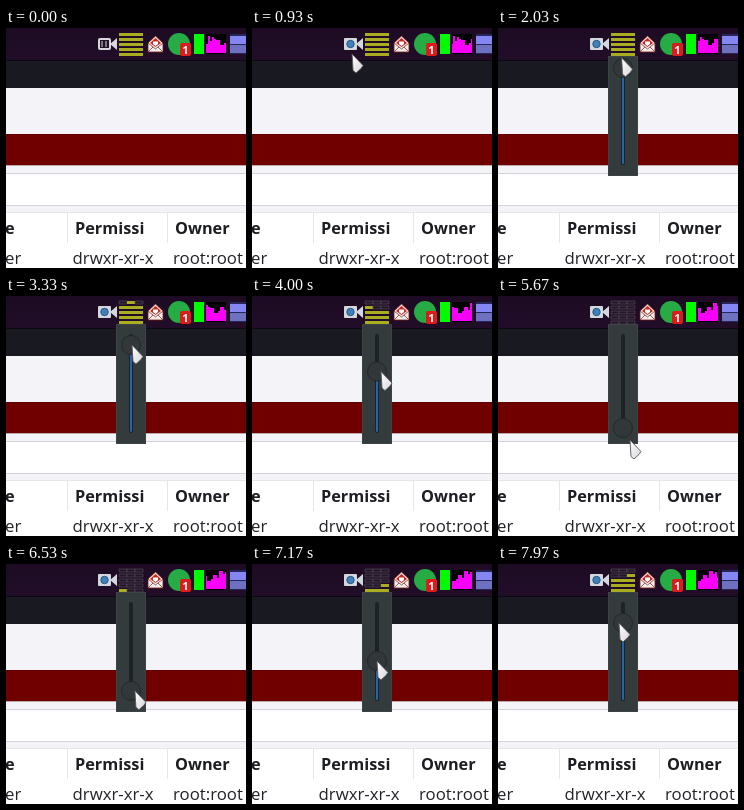
An HTML page for the animation above (8 s loop, 240x240 px).

```html
<!DOCTYPE html>
<html lang="en">
<head>
<meta charset="utf-8">
<title>Volume slider</title>
<style>
  html, body { margin: 0; width: 100%; height: 100%; overflow: hidden; background: #f4f3f8; }
  svg { display: block; width: 100vw; height: 100vh; }
  text { font-family: "Open Sans", "Noto Sans", sans-serif; font-size: 16.8px; fill: #232429; }
  .head { font-weight: 700; font-size: 16.3px; fill: #1d1e23; }
  .badge { font-weight: 700; font-size: 11px; fill: #fff; }
</style>
</head>
<body>
<svg viewBox="0 0 240 240">
  <defs>
    <linearGradient id="panel" x2="0" y2="1">
      <stop offset="0" stop-color="#1d0b23"/>
      <stop offset="1" stop-color="#210d28"/>
    </linearGradient>
    <linearGradient id="tip" x2="1" y2="1">
      <stop offset="0" stop-color="#fff"/>
      <stop offset="1" stop-color="#d6d6da"/>
    </linearGradient>
  </defs>

  <!-- Page -->
  <rect width="240" height="240" fill="#f4f3f8"/>
  <rect y="33" width="240" height="27" fill="#191922"/>
  <rect y="106" width="240" height="31" fill="#700000"/>
  <rect y="106" width="240" height="1" fill="#5c0000"/>
  <rect y="137" width="240" height="1" fill="#bda9ad"/>
  <rect x="-2" y="145.5" width="244" height="32" fill="#fff" stroke="#d3d2d8"/>
  <rect y="184" width="240" height="56" fill="#fff"/>
  <path d="M0 184.5H240M61.5 184V215M161.5 184V215" stroke="#e6e6ea" fill="none"/>
  <text class="head" x="-1" y="206">e</text>
  <text class="head" x="69" y="206">Permissi</text>
  <text class="head" x="169" y="206">Owner</text>
  <text x="-1" y="236">er</text>
  <text x="66.5" y="236">drwxr-xr-x</text>
  <text x="167" y="236">root:root</text>

  <!-- Panel -->
  <rect width="240" height="32" fill="url(#panel)"/>
  <rect y="32" width="240" height="1" fill="#0d0911"/>
  <g id="video">
    <rect x="93" y="11" width="11" height="10" rx="1" fill="#211329" stroke="#d9d6dc" stroke-width="2"/>
    <path d="M96 13V19M100 13V19" stroke="#d9d6dc"/>
    <path d="M104 16L111 10V22Z" fill="#d9d6dc"/>
  </g>
  <g id="photo">
    <rect x="92" y="10" width="13" height="12" rx="1" fill="#d3d8df"/>
    <path d="M104 16L111 10V22Z" fill="#d3d8df"/>
    <circle cx="98.5" cy="16" r="3.7" fill="#3f82bb" stroke="#28567f"/>
  </g>
  <g id="bars"></g>
  <path d="M142 15L149.5 8L157 15V24H142Z" fill="#f3eceb" stroke="#7d1712" stroke-width=".8"/>
  <path d="M144 15L149.5 10L155 15L149.5 19Z" fill="#c32a20"/>
  <path d="M147 13.5H152V16L149.5 18L147 16Z" fill="#fff"/>
  <path d="M142 15L149.5 21L157 15M142 24L147 19M157 24L152 19" fill="none" stroke="#7d3a36" stroke-width=".8"/>
  <circle cx="173" cy="16" r="11" fill="#27ab45"/>
  <rect x="174" y="15" width="11" height="13" rx="2" fill="#dc1c1c"/>
  <text class="badge" x="179.5" y="25.5" text-anchor="middle">1</text>
  <rect x="188" y="6" width="10" height="20" fill="#00fb00"/>
  <rect x="200" y="6" width="20" height="20" fill="#000"/>
  <path id="graph" fill="#f800f8"/>
  <rect x="224" y="6" width="16" height="20" fill="#26265a"/>
  <rect x="224" y="8" width="16" height="8" fill="#8486f4"/>
  <rect x="224" y="17" width="16" height="8" fill="#6e70c0"/>

  <!-- Slider -->
  <g id="popup">
    <rect x="110" y="28" width="30" height="120" fill="#343b3c"/>
    <rect x="110.5" y="28.5" width="29" height="119" fill="none" stroke="#3d4445"/>
    <rect x="123" y="38" width="4" height="99" rx="2" fill="#1d2224"/>
    <rect id="fill" x="124" width="2" rx="1" fill="#2465ad"/>
    <circle id="knob" cx="125" r="9.5" fill="#32383a" stroke="#23282a"/>
  </g>
  <path id="cursor" d="M0 0L11 11.5L9 14.5L4 19L1 16.5Z" fill="url(#tip)" stroke="#55555a" stroke-width=".9" stroke-linejoin="round"/>
</svg>
<script>
const LOOP = 8000, TOP = 40, BOTTOM = 132;
const OPEN_AT = 1500, DRAG_AT = 2600, RECORD_AT = 40;
const $ = id => document.getElementById(id);
const clamp = (v, a, b) => Math.min(b, Math.max(a, v));
const show = (id, on) => $(id).setAttribute("visibility", on ? "visible" : "hidden");

// time, x, y
const path = [
  [0, 100, 20], [930, 100, 26], [1300, 120, 17], [1650, 121, 19],
  [2400, 126, 40], [3330, 126, 49], [3800, 128, 66], [4600, 132, 104],
  [5000, 133, 126], [5350, 133, 142], [5670, 132, 144], [6150, 131, 142],
  [6700, 128, 120], [7170, 125, 97], [7970, 121, 59], [8000, 121, 58]
];

function pointer(t) {
  const i = Math.max(1, path.findIndex(p => p[0] >= t));
  const a = path[i - 1], b = path[i];
  const u = (t - a[0]) / (b[0] - a[0]);
  return [1, 2].map(k => a[k] + (b[k] - a[k]) * u);
}

// Five bars of three cells, from the bottom up
const bars = Array.from({ length: 5 }, (_, row) =>
  Array.from({ length: 3 }, (_, col) => {
    const cell = document.createElementNS("http://www.w3.org/2000/svg", "path");
    cell.setAttribute("d", `M${113 + col * 8} ${25 - row * 5}h8v3h-8z`);
    return $("bars").appendChild(cell);
  }));

function paintCell(cell, on) {
  cell.setAttribute("fill", on ? "#a9ad1f" : "#241729");
  cell.setAttribute("stroke", on ? "none" : "#58515d");
  cell.setAttribute("stroke-width", 0.6);
}

// A partly filled bar lights one cell
function drawBars(level) {
  bars.forEach((cells, row) => {
    const part = level - row;
    cells.forEach((cell, col) => {
      paintCell(cell, part >= 1 || part > 0 && Math.floor(part * 3) === col);
    });
  });
}

function load(n) {
  const r = Math.sin(n * 12.9898) * 43758.5453;
  return Math.round(9 + 3 * Math.sin(n * 0.55) + 7 * (r - Math.floor(r)));
}

function drawGraph(t) {
  const shift = Math.floor(t / 500);
  let d = "";
  for (let i = 0; i < 20; i++) {
    d += `M${200 + i} 25h1v${-load((i + shift) >> 1)}h-1z`;
  }
  $("graph").setAttribute("d", d);
}

function render(t) {
  const [x, y] = pointer(t);
  const knob = t < DRAG_AT ? TOP : clamp(y, TOP, BOTTOM);

  show("video", t < RECORD_AT);
  show("photo", t >= RECORD_AT);
  show("cursor", t >= RECORD_AT);
  show("popup", t >= OPEN_AT);

  drawBars((BOTTOM - knob) / (BOTTOM - TOP) * 5);
  $("knob").setAttribute("cy", knob);
  $("fill").setAttribute("y", knob);
  $("fill").setAttribute("height", Math.max(0, 136 - knob));
  $("cursor").setAttribute("transform", `translate(${x} ${y})`);
  drawGraph(t);
}

const start = performance.now();
function tick() {
  render((performance.now() - start) % LOOP);
  requestAnimationFrame(tick);
}
tick();
</script>
</body>
</html>
```
